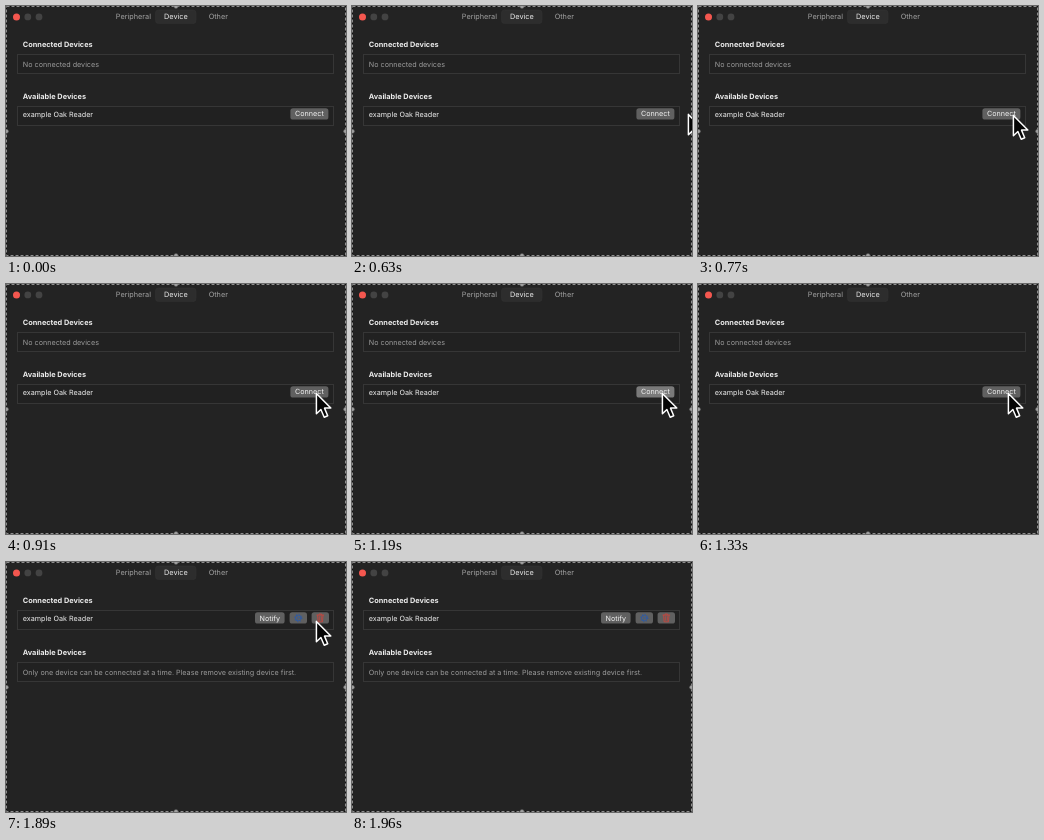
Animation of 340x250 px, one loop 3010 ms. Source, as an HTML page:

```html
<!DOCTYPE html>
<html lang="en">
<head>
<meta charset="utf-8">
<title>Device pairing</title>
<style>
  html, body { margin: 0; width: 100%; height: 100%; overflow: hidden; background: #232323; }
  svg { display: block; width: 340px; height: 250px; text-rendering: geometricPrecision; }
  text { font: 400 7.2px Inter, "Liberation Sans", sans-serif; fill: #f0f0f0; }
  .head { font-size: 7.35px; font-weight: 700; fill: #ececec; }
  .dim { fill: #9c9c9c; }
  .tab { font-size: 7.3px; fill: #a2a2a2; text-anchor: middle; }
  .on { fill: #ececec; }
  .label { text-anchor: middle; fill: #f2f2f2; }
  .box { fill: #212121; stroke: #363636; stroke-width: 1; }
  .btn { fill: #606060; }
  .icon { fill: none; stroke-width: .9; stroke-linecap: round; stroke-linejoin: round; }
  .handle { fill: #a0a0a0; stroke: #4c4c4c; stroke-width: .5; }
  .edge { fill: none; stroke-width: 1; }
</style>
</head>
<body>
<svg viewBox="0 0 340 250">
  <rect width="340" height="250" fill="#232323"/>

  <circle cx="10.5" cy="10.9" r="3.5" fill="#f4574f"/>
  <circle cx="21.8" cy="10.9" r="3.4" fill="#434343"/>
  <circle cx="33" cy="10.9" r="3.4" fill="#434343"/>
  <rect x="149.5" y="4" width="40.5" height="13.6" rx="3" fill="#2d2d2d" stroke="#343434" stroke-width=".5"/>
  <text class="tab" x="127.4" y="13.3">Peripheral</text>
  <text class="tab on" x="169.9" y="13.3">Device</text>
  <text class="tab" x="212.3" y="13.3">Other</text>

  <text class="head" x="16.8" y="40.5">Connected Devices</text>
  <rect class="box" x="11.5" y="48.5" width="316" height="19"/>
  <text class="head" x="16.8" y="92.6">Available Devices</text>
  <rect class="box" x="11.5" y="100.5" width="316" height="19"/>

  <g id="before">
    <text class="dim" x="16.8" y="61.1">No connected devices</text>
    <text x="16.8" y="110.6">example Oak Reader</text>
    <rect id="connect" class="btn" x="284.4" y="102.2" width="38" height="11.4" rx="2.6"/>
    <text class="label" x="303.4" y="110.4">Connect</text>
  </g>

  <g id="after">
    <text x="16.8" y="58.6">example Oak Reader</text>
    <rect class="btn" x="249" y="50.2" width="29.6" height="11.4" rx="2.6"/>
    <text class="label" x="263.8" y="58.5">Notify</text>
    <rect class="btn" x="283.6" y="50.2" width="17.4" height="11.4" rx="2.6"/>
    <g class="icon" stroke="#2c5ba8">
      <circle cx="292.3" cy="56" r="2.9"/>
      <circle cx="292.3" cy="56" r="3.8" stroke-dasharray="1 1.985" stroke-linecap="butt"/>
      <path d="M292.3 56h2.7M292.3 56l-1.4 -2.4M292.3 56l-1.4 2.4" stroke-width=".6"/>
    </g>
    <rect class="btn" x="305.6" y="50.2" width="17.4" height="11.4" rx="2.6"/>
    <path class="icon" stroke="#c2473f" d="M310.9 53.1h6.8M313 53v-1h2.6v1M311.6 53.2l.5 6.6h4.4l.5 -6.6M313.3 54.7v3.6M315.3 54.7v3.6"/>
    <text class="dim" x="16.8" y="113">Only one device can be connected at a time. Please remove existing device first.</text>
  </g>

  <rect class="edge" x=".5" y=".5" width="339" height="249" stroke="#101010"/>
  <rect class="edge" x=".5" y=".5" width="339" height="249" stroke="#8e8e8e" stroke-dasharray="3 2"/>
  <circle class="handle" cx="170" cy=".4" r="2.1"/>
  <circle class="handle" cx="170" cy="249.6" r="2.1"/>
  <circle class="handle" cx=".4" cy="125.3" r="2.1"/>
  <circle class="handle" cx="339.6" cy="125.3" r="2.1"/>

  <path id="cursor" d="M.4 1.4V21.8L4.9 17.5L8.2 25.2L11.7 23.7L8.5 16.1H14.8Z"
        fill="#050505" stroke="#fff" stroke-width="1.5" stroke-linejoin="round"/>
</svg>
<script>
  const LOOP = 3010;
  const CONNECTED = 1400;
  const PRESS = [1190, 1330];

  // [time, x, y] of the pointer; no position means hidden
  const path = [
    [0],
    [630, 336, 107],
    [700, 323, 107.6],
    [770, 315, 108],
    [840, 311.5, 108],
    [910, 310, 108],
    [1890, 310, 58],
    [1960]
  ];

  const $ = id => document.getElementById(id);
  const cursor = $('cursor'), connect = $('connect');
  const show = (el, on) => { el.style.display = on ? '' : 'none'; };

  function draw(t) {
    const [, x, y] = path.findLast(step => step[0] <= t);
    show(cursor, x !== undefined);
    if (x !== undefined) cursor.setAttribute('transform', `translate(${x} ${y})`);
    show($('before'), t < CONNECTED);
    show($('after'), t >= CONNECTED);
    connect.style.fill = t >= PRESS[0] && t < PRESS[1] ? '#7a7a7a' : '';
  }

  const start = performance.now();
  function tick() {
    draw((performance.now() - start) % LOOP);
    requestAnimationFrame(tick);
  }
  tick();
</script>
</body>
</html>
```
